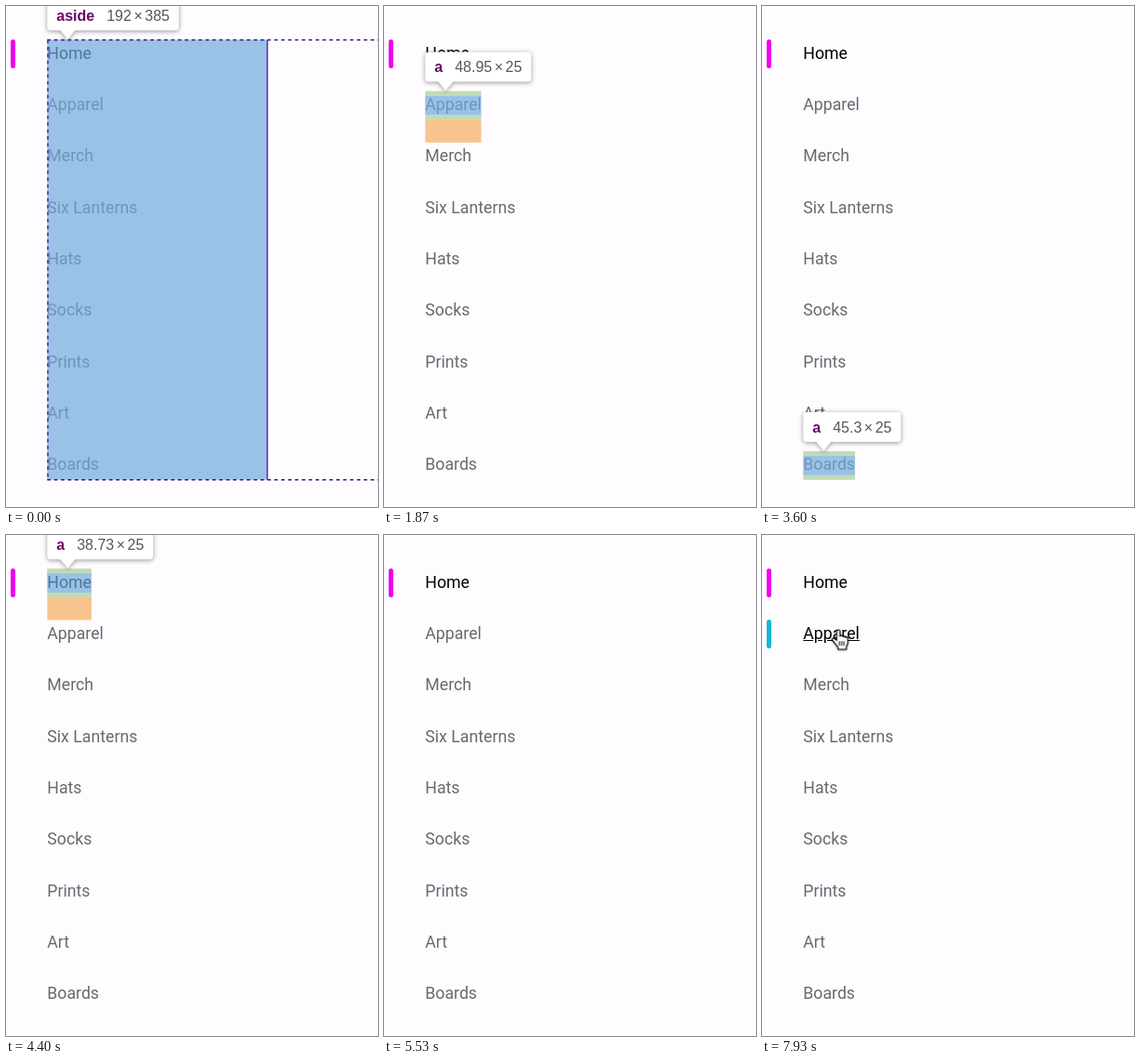
Recreate the animation shown at these times as an HTML page. Size 400 by 539 pixels, loop 8 s.

```html
<!DOCTYPE html>
<html lang="en">
<head>
<meta charset="utf-8">
<title>Sidebar inspection</title>
<style>
  html, body { margin: 0; width: 100%; height: 100%; overflow: hidden; background: #fefcff; }
  #stage { position: relative; width: 400px; height: 539px; overflow: hidden; }
  #stage a {
    position: absolute; left: 44.3px; white-space: nowrap; color: #69696d;
    font: 17.72px/20.9px Roboto, sans-serif;
    text-decoration: underline transparent;
  }
  #stage a:first-child { color: #000; animation: home-hover 8s step-end infinite; }
  #stage a:nth-child(2) { animation: apparel-hover 8s step-end infinite; }
  .bar { position: absolute; left: 5px; width: 5px; height: 31px; border-radius: 2.5px; }
  .active { top: 36px; background: #ee00ee; }
  .hover { top: 91px; background: #0cb9d4; animation: bar 8s step-end infinite; }
  svg { position: absolute; left: 0; top: 0; overflow: hidden; }
  .mark { opacity: 0; animation: 8s step-end infinite; }
  .content { fill: rgba(111, 168, 220, .7); }
  .padding { fill: rgba(147, 196, 125, .58); }
  .margin { fill: rgba(246, 178, 107, .76); }
  .guide { fill: none; stroke: #35107f; stroke-width: 1.3; }
  .dash { stroke-dasharray: 3.7; }
  .tip { filter: drop-shadow(0 1.5px 2.5px rgba(0, 0, 0, .42)); fill: #fff; }
  .mark text { font: 16px "Liberation Sans", Arial, sans-serif; fill: #56565a; }
  .mark .tag { font-weight: bold; fill: #6b0569; }
  #cursor { animation: path 8s linear infinite; filter: drop-shadow(0 1px 1px rgba(0, 0, 0, .35)); }
  #arrow { animation: arrow 8s step-end infinite; }
  #hand { animation: hand 8s step-end infinite; }

  @keyframes path {
    0%, 69.1% { transform: translate(-20px, 190px); }
    71.6% { transform: translate(253px, 134px); }
    74.1%, 75.8% { transform: translate(278px, 136px); }
    76.7% { transform: translate(292px, 139px); }
    78% { transform: translate(272px, 128px); }
    80.87% { transform: translate(139.5px, 69px); }
    83% { transform: translate(88px, 56px); }
    85.8% { transform: translate(75px, 50px); }
    89.1%, 94.1% { transform: translate(78px, 61px); }
    95% { transform: translate(78.5px, 67px); }
    95.9% { transform: translate(79.3px, 80px); }
    96.7% { transform: translate(80px, 92px); }
    97.6% { transform: translate(80.5px, 99px); }
    98.5%, 100% { transform: translate(80.5px, 101px); }
  }
  @keyframes home-hover {
    0%, 95%, 100% { text-decoration-color: transparent; }
    82.6% { text-decoration-color: #000; }
  }
  @keyframes apparel-hover {
    0% { color: #69696d; text-decoration-color: transparent; }
    96.6%, 100% { color: #000; text-decoration-color: #000; }
  }
</style>
</head>
<body>
<div id="stage"></div>
<script>
const LOOP = 8000, S = 1.23, LEFT = 44.3, TOP = 36.2, PITCH = 45 * S;

// label, width in CSS pixels
const items = [
  ["Home", 38.73], ["Apparel", 48.95], ["Merch", 40.53], ["Six Lanterns", 78.87], ["Hats", 30.24],
  ["Socks", 39.02], ["Prints", 37.54], ["Art", 18.97], ["Boards", 45.3]
];

// start time and inspected row; -1 is the aside, null is nothing
const schedule = [
  [0, -1], [1300, 0], [1530, 1], [1930, 2], [2100, 3], [2330, 4], [2530, 5], [2670, 6],
  [2870, 7], [3070, 8], [3730, 7], [3800, 6], [3870, 5], [3930, 4], [4070, 3], [4130, 2],
  [4200, 1], [4270, 0], [4670, -1], [5470, null]
];

const rowTop = i => TOP + PITCH * i;
const rect = (kind, x, y, w, h) => `<rect class="${kind}" x="${x}" y="${y}" width="${w}" height="${h}"/>`;

function showDuring(name, spans) {
  const at = (t, o) => `${t / LOOP * 100}% { opacity: ${o}; }`;
  const steps = spans.map(([from, to]) => at(from, 1) + at(to, 0)).join("");
  return `@keyframes ${name} { 0%, 100% { opacity: 0; } ${steps} }`;
}

function spansOf(row) {
  return schedule.flatMap(([from, r], k) => r === row ? [[from, schedule[k + 1][0]]] : []);
}

function tooltip(tag, width, height, top) {
  const x = LEFT - Math.max(0, (44 - width * S) / 2);
  const y = top - 42, base = top - 20.3, w = String(width), h = String(height);
  const textWidth = s => [...s].reduce((sum, c) => sum + (c === "." ? 4.45 : 8.9), 0);
  const dimX = x + 23 + (tag === "a" ? 8.9 : 40.9);
  const right = dimX + textWidth(w) + textWidth(h) + 14.3 + 10;
  return `<path class="tip" d="M${x + 4} ${y}H${right - 4}q4 0 4 4v24q0 4-4 4H${x + 30}l-8 9.5-8-9.5H${x + 4}
    q-4 0-4-4v-24q0-4 4-4z"/>
    <text class="tag" x="${x + 10}" y="${base}">${tag}</text>
    <text x="${dimX}" y="${base}">${w}<tspan dx="2.5">×</tspan><tspan dx="2.5">${h}</tspan></text>`;
}

function linkMark(i) {
  const w = items[i][1] * S, y = rowTop(i), pad = 4 * S, inner = 17 * S;
  const last = i === items.length - 1;
  return rect("padding", LEFT, y, w, pad)
    + rect("content", LEFT, y + pad, w, inner)
    + rect("padding", LEFT, y + pad + inner, w, pad)
    + (last ? "" : rect("margin", LEFT, y + 25 * S, w, 20 * S))
    + tooltip("a", items[i][1], 25, y);
}

function asideMark() {
  const w = 192 * S, h = 385 * S, right = LEFT + w + .5, bottom = TOP + h;
  return rect("content", LEFT, TOP, w, h)
    + `<path class="guide dash" d="M${LEFT} 36.5H400M${LEFT} ${bottom}H400M45 36.5V${bottom}"/>
       <path class="guide" d="M${right} 36.5V${bottom}"/>`
    + tooltip("aside", 192, 385, TOP);
}

const mark = (name, body) => `<g class="mark" style="animation-name:${name}">${body}</g>`;

const sheet = document.createElement("style");
sheet.textContent = [
  showDuring("aside", spansOf(-1)),
  ...items.map((_, i) => showDuring("row" + i, spansOf(i))),
  showDuring("arrow", [[5530, 6610], [7600, 7728]]),
  showDuring("hand", [[6610, 7600], [7728, LOOP]]),
  showDuring("bar", [[7728, LOOP]])
].join("\n");
document.head.append(sheet);

document.getElementById("stage").innerHTML =
  items.map(([label], i) => `<a style="top:${rowTop(i) + 4.4}px">${label}</a>`).join("")
  + `<div class="bar active"></div><div class="bar hover"></div>
  <svg width="400" height="539">
    ${mark("aside", asideMark())}
    ${items.map((_, i) => mark("row" + i, linkMark(i))).join("")}
    <g id="cursor" stroke-linejoin="round" stroke-linecap="round">
      <path id="arrow" fill="#000" stroke="#fff" stroke-width="1.1"
        d="M0 0V16.2l3.7-3.5 2.5 5.9 2.8-1.2-2.5-5.8h5.1z"/>
      <g id="hand" transform="translate(-6 0)" stroke="#000" stroke-width="1.2">
        <path fill="#fff" d="M5.8 12.4V2.8a1.8 1.8 0 0 1 3.6 0V8a1.6 1.6 0 0 1 3.1.6a1.5 1.5 0 0 1 2.8.7
          a1.4 1.4 0 0 1 2.5 1v4.4c0 2.2-1.6 3.4-1.6 5.4V22H7.4v-1.8C6.4 18 3 14.8 1.2 12.2
          c-1-1.7 1-2.9 2.3-1.7z"/>
        <path fill="none" stroke-width="1" d="M8.7 13.6v4.2M11.2 13.6v4.2M13.7 13.6v4.2"/>
      </g>
    </g>
  </svg>`;
</script>
</body>
</html>
```
